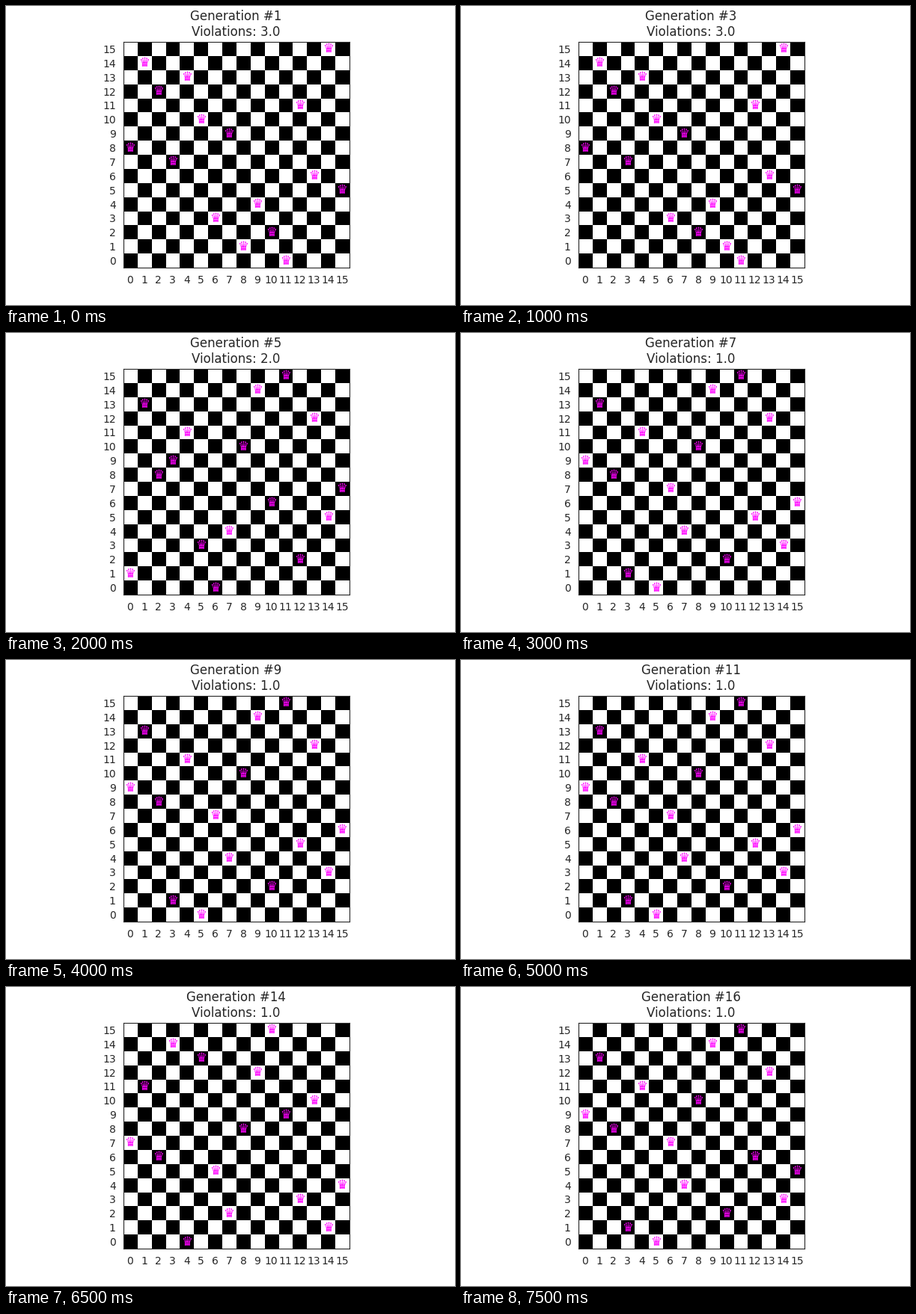
Animation, 600 px wide and 400 px high, one loop 8000 ms. Source, as a matplotlib script:

```python
import numpy as np
import matplotlib.pyplot as plt
from matplotlib.animation import FuncAnimation

N = 16
INK = "0.15"
plt.rcParams["font.family"] = "DejaVu Sans"


def rotate(rows, *cols):
    """Mutate a board: each listed column takes the row of the next one."""
    child = rows.copy()
    child[list(cols)] = rows[np.roll(cols, -1)]
    return child


def violations(rows):
    """Surplus queens over all diagonals."""
    cols = np.arange(N)
    return float(sum(N - len(set(diag)) for diag in (rows - cols, rows + cols)))


# Two parent boards, giving the queen's row in each column
start = np.array([8, 14, 12, 7, 13, 10, 3, 9, 1, 4, 2, 0, 11, 6, 15, 5])
best = np.array([9, 13, 8, 1, 11, 0, 7, 4, 10, 14, 2, 15, 5, 12, 3, 6])

# Each board with the number of generations it survives
history = [
    (start, 2),
    (rotate(start, 8, 10), 1),
    (rotate(best, 10, 15, 14, 12), 1),
    (rotate(rotate(best, 0, 3), 5, 14, 12, 10, 15, 6), 1),
    (best, 8),
    (rotate((best - 2) % N, 3, 5, 11, 4, 10), 1),
    (rotate(best, 12, 15), 2),
]
boards = [rows for rows, span in history for _ in range(span)]

fig, ax = plt.subplots(figsize=(6, 4), dpi=100, facecolor="white")
fig.subplots_adjust(left=0.125, right=0.9, bottom=0.125, top=0.88)

checker = np.add.outer(np.arange(N), np.arange(N)) % 2
ax.imshow(checker, cmap="gray", origin="lower", interpolation="nearest")
ax.set_xticks(range(N))
ax.set_yticks(range(N))
ax.tick_params(length=0, pad=7, labelsize=10, labelcolor=INK)
for spine in ax.spines.values():
    spine.set(color=INK, linewidth=0.8)

title = ax.set_title("", fontsize=12, color=INK, pad=6)
queens = [ax.text(col, 0, "\u265b", color="magenta", fontsize=12,
                  ha="center", va="center") for col in range(N)]


def draw(i):
    rows = boards[i]
    title.set_text(f"Generation #{i + 1}\nViolations: {violations(rows)}")
    for queen, row in zip(queens, rows):
        queen.set_y(row)
    return [title, *queens]


anim = FuncAnimation(fig, draw, frames=len(boards), interval=500, repeat=True,
                     repeat_delay=0, init_func=lambda: draw(0))
plt.show()
```
